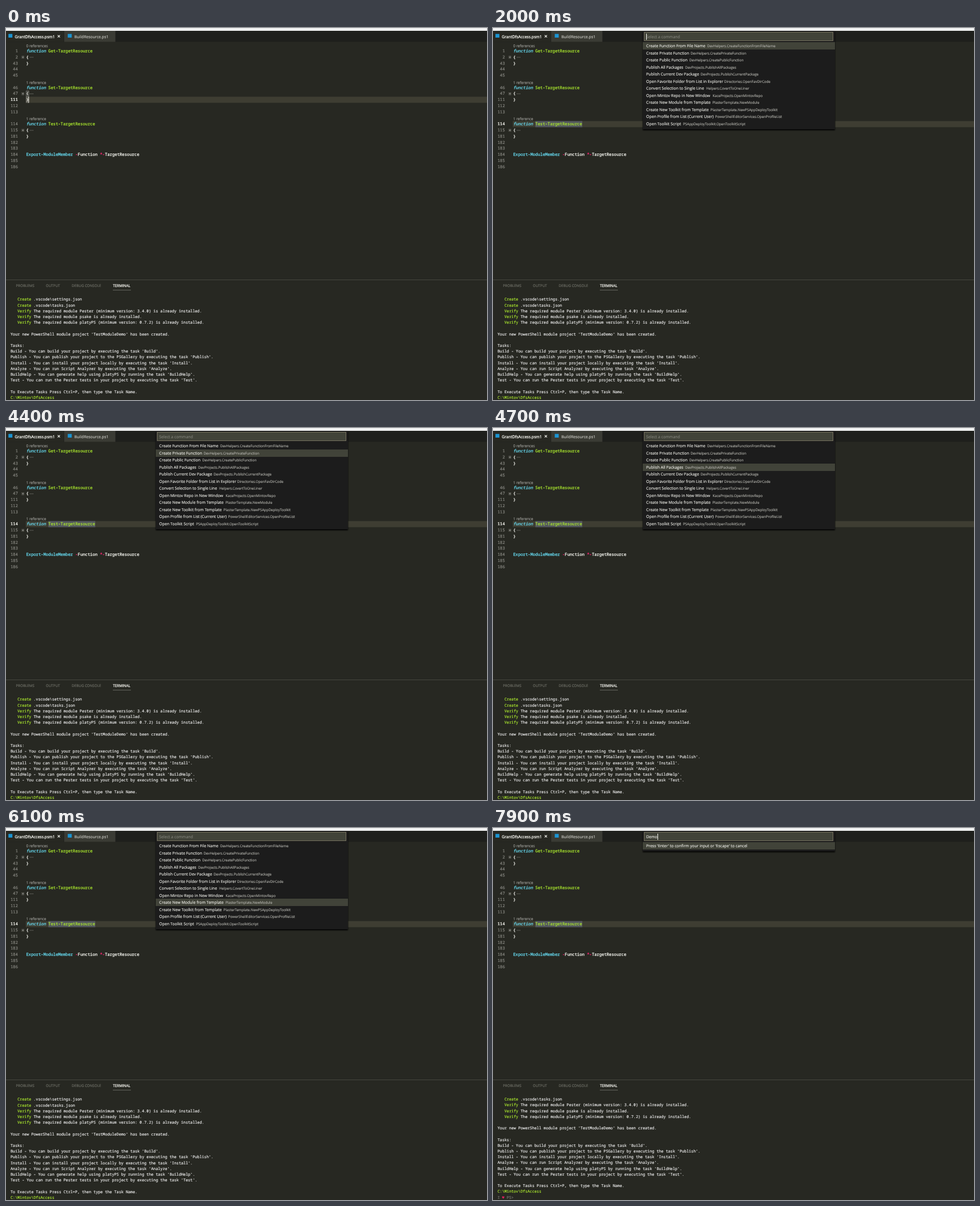
Recreate the animation shown at these times as an HTML page. Size 851x658 px, loop 8000 ms.

```html
<!DOCTYPE html>
<html lang="en">
<head>
<meta charset="utf-8">
<title>Editor command palette</title>
<style>
html, body { margin: 0; width: 100%; height: 100%; overflow: hidden; background: #272822; }
svg { display: block; width: 851px; height: 658px; }
text { white-space: pre; text-rendering: geometricPrecision; stroke-width: .14px; font: 7px "Open Sans", "Noto Sans", sans-serif; }
.code { font: 500 7.25px "Noto Sans Mono", "DejaVu Sans Mono", monospace; stroke-width: .28px; }
.num { font: 7.25px "Noto Sans Mono", "DejaVu Sans Mono", monospace; }
.term { font: 6.8px "Noto Sans Mono", "DejaVu Sans Mono", monospace; stroke-width: .2px; }
.title { stroke-width: .28px; }
.lens { font-size: 6.7px; }
.cap { font-size: 6.35px; }
.note { font-size: 6.2px; }
</style>
</head>
<body>
<svg id="stage" viewBox="0 0 851 658">
  <defs>
    <filter id="shade" x="-5%" y="-20%" width="110%" height="150%">
      <feDropShadow dx="0" dy="1.8" stdDeviation="1.3" flood-color="#000"/>
    </filter>
  </defs>
</svg>
<script>
const NS = "http://www.w3.org/2000/svg";
const stage = document.getElementById("stage");

const C = {
  bg: "#272822", dark: "#1e1f1c", line: "#3e3d32", field: "#414339", white: "#f8f8f2",
  cyan: "#66d9ef", green: "#a6e22e", pink: "#f92672", num: "#90908a", lens: "#999994", term: "#e6e6e6"
};

function add(tag, attrs, parent = stage) {
  const el = document.createElementNS(NS, tag);
  for (const k in attrs) el.setAttribute(k, attrs[k]);
  return parent.appendChild(el);
}
const group = (parent, attrs = {}) => add("g", attrs, parent);
const rect = (x, y, width, height, fill, parent, more) =>
  add("rect", { x, y, width, height, fill, ...more }, parent);

// Text carries a hairline stroke in its own colour to firm up the small glyphs.
const ink = color => ({ fill: color, stroke: color });

function text(x, y, str, color, cls, parent, more) {
  const el = add("text", { x, y, ...ink(color), class: cls || "", ...more }, parent);
  el.textContent = str;
  return el;
}

// One line made of [string, colour, extra attributes] parts.
function parts(x, y, list, cls, parent) {
  const el = add("text", { x, y, class: cls }, parent);
  for (const [str, color, more] of list) add("tspan", { ...ink(color), ...more }, el).textContent = str;
  return el;
}
const show = (el, on) => el.setAttribute("display", on ? "inline" : "none");

// Window top and tabs
rect(0, 0, 851, 5, "#f0f1f1");
rect(0, 5, 851, 19.5, C.dark);
rect(0, 5, 102.5, 19.5, C.bg);
rect(103, 5, 90.5, 19.5, "#3a3b34");
rect(4.3, 10.5, 7, 6.5, "#1c94d2");
rect(109.3, 10.5, 7, 6.5, "#1c94d2");
text(15.5, 17.6, "GrantDfsAccess.psm1", C.white, "title");
text(121, 17.6, "BuildResource.ps1", "#cdcdc7", "", stage, { "font-style": "italic" });
add("path", { d: "M91.5 12.7l4 4m0-4l-4 4", stroke: C.white, "stroke-width": 1.1 });

// Editor
const PITCH = 10.77, LEFT = 35.7, CH = 4.35;
const rowTop = k => 35.4 + PITCH * k;
const base = k => 43 + PITCH * k;

const band = rect(35, 0, 816, PITCH, C.line);
const pick = rect(75, rowTop(12), 83, PITCH, "#54585f");

const rowNums = [1, 2, 43, 44, 45, , 46, 47, 111, 112, 113, , 114, 115, 181, 182, 183, 184, 185, 186];
const nums = {};
rowNums.forEach((n, k) => {
  nums[n] = text(21, base(k), n, C.num, "num", stage, { "text-anchor": "end" });
});

function fold(k) {
  const y = base(k);
  rect(28, y - 4, 3.8, 3.8, "none", stage, { stroke: "#77776f", "stroke-width": .6 });
  add("path", { d: `M28.9 ${y - 2.1}h2m-1-1v2`, stroke: "#c5c5c0", "stroke-width": .8 });
  for (let i = 0; i < 3; i++) rect(42.4 + i * 2.3, y - 2.5, 1.2, 1, "#8c8c86");
}
[["Get", 0, "0 references"], ["Set", 6, "1 reference"], ["Test", 12, "1 reference"]].forEach(([verb, k, lens]) => {
  text(35.7, base(k - 1) + 1.7, lens, C.lens, "lens");
  parts(LEFT, base(k), [
    ["function", C.cyan, { "font-style": "italic" }],
    [" " + verb + "-TargetResource", C.green]
  ], "code");
  text(LEFT, base(k + 1), "{", C.white, "code");
  text(LEFT, base(k + 2), "}", C.white, "code");
  fold(k + 1);
});
parts(LEFT, base(17), [
  ["Export-ModuleMember ", C.cyan], ["-", C.pink], ["Function ", C.white],
  ["*-", C.pink], ["TargetResource", C.white]
], "code");

const braces = group(stage);
for (const k of [7, 8])
  rect(LEFT + .2, rowTop(k) + .5, CH, PITCH - 1, "none", braces, { stroke: "#888882", "stroke-width": .8 });
const caret = rect(0, 0, 1, PITCH, C.white);

// Panel
rect(0, 445, 851, 1, "#46473f");
text(17.5, 457.5, "PROBLEMS", "#73746c", "cap");
text(70.5, 457.5, "OUTPUT", "#73746c", "cap");
text(116.3, 457.5, "DEBUG CONSOLE", "#73746c", "cap");
text(189.3, 457.5, "TERMINAL", "#f0f0ea", "cap title");
rect(189, 463.3, 32, .8, "#77786f");

const ROW = 10.2;
const termLines = [
  "+Create .vscode\\settings.json",
  "+Create .vscode\\tasks.json",
  "+Verify The required module Pester (minimum version: 3.4.0) is already installed.",
  "+Verify The required module psake is already installed.",
  "+Verify The required module platyPS (minimum version: 0.7.2) is already installed.",
  "",
  "Your new PowerShell module project 'TestModuleDemo' has been created.",
  "",
  "Tasks:",
  "Build - You can build your project by executing the task 'Build'.",
  "Publish - You can publish your project to the PSGallery by executing the task 'Publish'.",
  "Install - You can install your project locally by executing the task 'Install'.",
  "Analyze - You can run Script Analyzer by executing the task 'Analyze'.",
  "BuildHelp - You can generate help using platyPS by running the task 'BuildHelp'.",
  "Test - You can run the Pester tests in your project by executing the task 'Test'.",
  "",
  "To Execute Tasks Press Ctrl+P, then type the Task Name."
];
const term = group(stage);
const termY = i => 482.3 + i * ROW;
const termRows = termLines.map((s, i) => {
  if (s[0] !== "+") return text(8, termY(i), s, C.term, "term", term);
  return parts(8, termY(i), [
    ["   " + s.slice(1, 7), C.green, { "font-weight": 500 }],
    [s.slice(7), C.term]
  ], "term", term);
});
text(8, termY(17), "C:\\Mintov\\DfsAccess", C.green, "term", term, { "font-weight": 500 });
const prompt = group(term);
text(8, termY(18), "I", "#75756f", "term", prompt);
text(16, termY(18), "♥", "#e0225f", "term", prompt);
text(24.3, termY(18), "PS>", "#75756f", "term", prompt);

// Command palette
const STEP = 12.47;
const palette = group(stage);
const sheet = rect(265, 5, 340, 174, C.dark, palette, { filter: "url(#shade)" });
rect(267.5, 7.5, 334, 15, C.field, palette, { stroke: "#75715e" });
const hint = text(271, 18.2, "", "#82837a", "", palette);
const typed = text(271, 18.2, "", "#f0f0ea", "", palette);
const bar = rect(265, 0, 340, 13, C.field, palette);
const list = group(palette);
[
  ["Create Function From File Name", 379, "DevHelpers.CreateFunctionFromFileName"],
  ["Create Private Function", 349.5, "DevHelpers.CreatePrivateFunction"],
  ["Create Public Function", 347.3, "DevHelpers.CreatePublicFunction"],
  ["Publish All Packages", 340, "DevProjects.PublishAllPackages"],
  ["Publish Current Dev Package", 367.3, "DevProjects.PublishCurrentPackage"],
  ["Open Favorite Folder from List in Explorer", 409, "Directories.OpenFavDirCode"],
  ["Convert Selection to Single Line", 377.3, "Helpers.CovertToOneLiner"],
  ["Open Mintov Repo in New Window", 388.5, "KaceProjects.OpenMintovRepo"],
  ["Create New Module from Template", 388.2, "PlasterTemplate.NewModule"],
  ["Create New Toolkit from Template", 384.8, "PlasterTemplate.NewPSAppDeployToolkit"],
  ["Open Profile from List (Current User)", 393, "PowerShellEditorServices.OpenProfileList"],
  ["Open Toolkit Script", 336.2, "PSAppDeployToolkit.OpenToolkitScript"]
].forEach(([label, x, id], i) => {
  const y = 34.4 + i * STEP;
  text(271, y, label, "#f0f0ea", "", list);
  text(x, y, id, "#b0b0aa", "note", list);
});
const confirm = text(271, 34.4, "Press 'Enter' to confirm your input or 'Escape' to cancel", "#f0f0ea", "", palette);
const cursor = rect(271, 10, 1, 11, C.white, palette);

// Number of listed moments already reached
const passed = (times, t) => times.filter(m => t >= m).length;

const moves = [4400, 4500, 4700, 4800, 5000, 5100, 5300, 5400];
const editorBlinks = [1000, 1500, 1900];
const cursorBlinks = [2500, 3000, 3400, 3800, 4300, 4800, 5200, 5700, 6100, 6500, 7800, 7900];
const keys = [6900, 7200, 7300, 7900];

function draw(t) {
  const moved = t >= 600, open = t >= 2000, asking = t >= 6500;

  // Current line and dragged selection
  band.setAttribute("y", rowTop(moved ? 12 : 8));
  for (const [n, on] of [[111, !moved], [114, moved]]) {
    const color = on ? "#e0e0da" : C.num;
    nums[n].setAttribute("fill", color);
    nums[n].setAttribute("stroke", color);
    nums[n].style.fontWeight = on ? 700 : 400;
  }
  show(braces, !moved);
  const width = 83 * Math.min(1, passed([700, 800], t) / 2);
  pick.setAttribute("width", width);
  caret.setAttribute("x", moved ? 74 + width : LEFT + CH - .6);
  caret.setAttribute("y", rowTop(moved ? 12 : 8));
  show(caret, passed(editorBlinks, t) % 2 === 0);

  // Terminal scrolls one row when the prompt returns
  term.setAttribute("transform", `translate(0 ${asking ? -ROW : 0})`);
  show(termRows[0], !asking);
  show(prompt, asking);

  show(palette, open);
  if (!open) return;
  const word = "Demo".slice(0, passed(keys, t));
  sheet.setAttribute("height", asking ? 36 : 174);
  bar.setAttribute("y", Math.round(25.4 + (asking ? 0 : passed(moves, t) * STEP)));
  show(list, !asking);
  show(confirm, asking);
  hint.textContent = word ? "" : asking ? "Enter name of the module" : "Select a command";
  typed.textContent = word;
  cursor.setAttribute("x", Math.round(271 + (word ? typed.getComputedTextLength() : 0)));
  show(cursor, passed(cursorBlinks, t) % 2 === 0);
}

const start = performance.now();
function tick() {
  draw((performance.now() - start) % 8000);
  requestAnimationFrame(tick);
}
draw(0);
requestAnimationFrame(tick);
</script>
</body>
</html>
```
